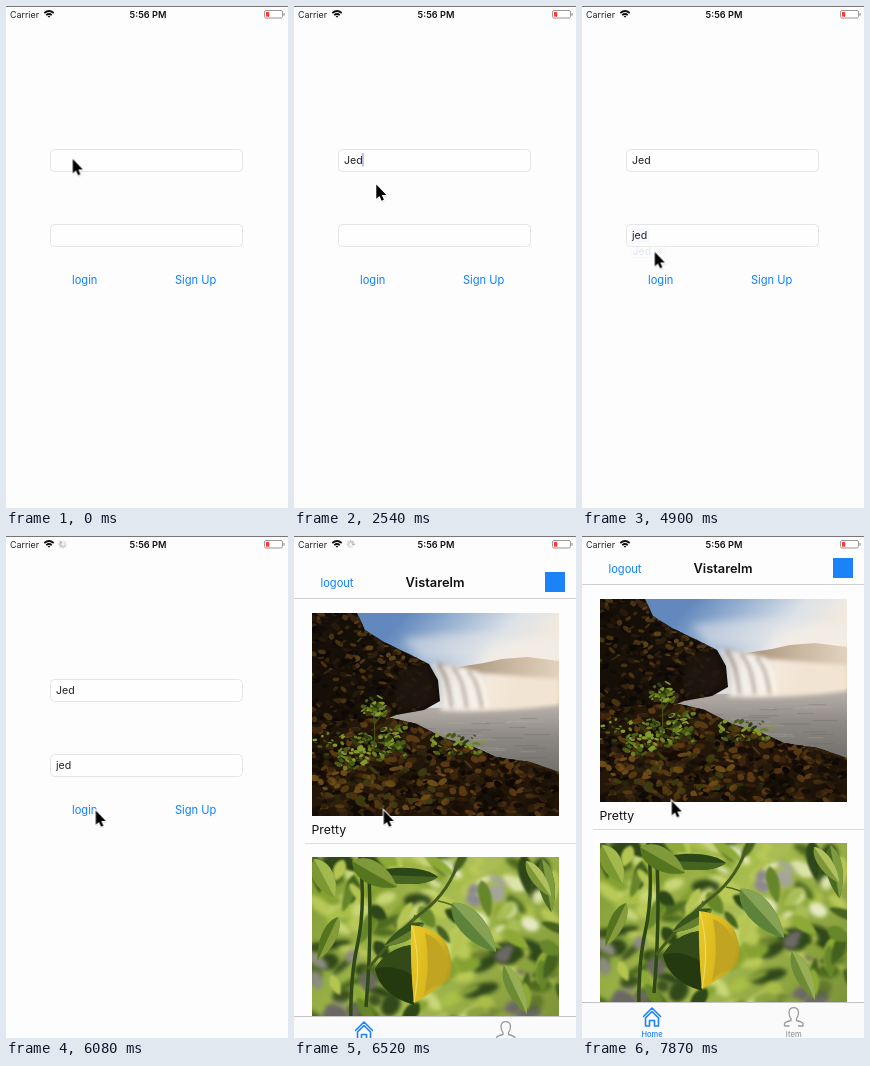
These frames come from a looping animation (282x502 px, 8 s). An HTML page with a canvas:

```html
<!DOCTYPE html>
<html lang="en">
<head>
<meta charset="utf-8">
<title>Login demo</title>
<style>
html, body { margin: 0; width: 100%; height: 100%; overflow: hidden; background: #fdfdfd; }
#stage { position: relative; width: 282px; height: 502px; overflow: hidden; background: #fdfdfd; font-family: Inter, Roboto, sans-serif; }
svg { position: absolute; left: 0; top: 0; overflow: visible; font-family: inherit; }
canvas { position: absolute; left: 18px; }
.anim { animation: 8s step-end -8ms infinite; }
.field { fill: #fefefe; stroke: #e5e5e5; }
.entry { font-size: 10.6px; fill: #222; }
.caret { fill: #4a62e0; }
.link { fill: #0f80fb; font-size: 11.1px; }
.mid { text-anchor: middle; }
#sheet { position: absolute; left: 0; top: 0; width: 282px; height: 502px; background: #fdfdfd; animation-name: rise; }
#cursor { animation-name: point; }

@keyframes point {
  0% { transform: translate(66.5px, 152.5px); }
  1.875% { transform: translate(66.5px, 154.5px); }
  29.875% { transform: translate(69px, 158px); }
  31.625% { transform: translate(82px, 178px); }
  33.5% { transform: translate(104px, 203px); }
  35.375% { transform: translate(124px, 222px); }
  37.25% { transform: translate(134px, 229px); }
  44.625% { transform: translate(170.5px, 220.5px); }
  52% { transform: translate(163px, 228px); }
  53.875% { transform: translate(140px, 239px); }
  55.75% { transform: translate(112px, 247px); }
  57.625% { transform: translate(86px, 249px); }
  59.375% { transform: translate(75px, 246px); }
  61.25% { transform: translate(72.5px, 245.5px); }
  63.125% { transform: translate(74px, 250px); }
  65% { transform: translate(80px, 262px); }
  66.875% { transform: translate(86px, 270px); }
  68.625% { transform: translate(89.5px, 274px); }
  98.375%, 100% { transform: translate(89.5px, 264.5px); }
}
@keyframes rise {
  0% { transform: translateY(502px); }
  77.875% { transform: translateY(496px); }
  79.625% { transform: translateY(123px); }
  81.5% { transform: translateY(14px); }
  83.375% { transform: translateY(1px); }
  85.25%, 100% { transform: none; }
}
@keyframes caretA {
  0% { opacity: 0; transform: none; }
  5.625% { opacity: 1; transform: none; }
  11.25% { opacity: .5; transform: none; }
  13.125% { opacity: 0; transform: none; }
  14.875% { opacity: .6; transform: none; }
  16.75% { opacity: 1; transform: translateX(5.7px); }
  22.375% { opacity: 1; transform: translateX(18px); }
  31.625% { opacity: .5; transform: translateX(18px); }
  33.5% { opacity: 1; transform: translateX(18px); }
  37.25%, 100% { opacity: 0; transform: none; }
}
@keyframes caretB {
  0% { opacity: 0; transform: none; }
  37.25% { opacity: 1; transform: none; }
  44.625% { opacity: .5; transform: none; }
  46.5% { opacity: 1; transform: translateX(2.6px); }
  48.375% { opacity: 1; transform: translateX(9px); }
  50.25% { opacity: 1; transform: translateX(15.5px); }
  59.375%, 100% { opacity: 0; transform: none; }
}
@keyframes key1 { 0% { visibility: hidden; } 16.75%, 100% { visibility: visible; } }
@keyframes key2 { 0% { visibility: hidden; } 22.375%, 100% { visibility: visible; } }
@keyframes key3 { 0% { visibility: hidden; } 46.5%, 100% { visibility: visible; } }
@keyframes key4 { 0% { visibility: hidden; } 48.375%, 100% { visibility: visible; } }
@keyframes key5 { 0% { visibility: hidden; } 50.25%, 100% { visibility: visible; } }
@keyframes hint {
  0% { opacity: 0; }
  52% { opacity: 1; }
  59.375% { opacity: .6; }
  61.25% { opacity: .16; }
  63.125%, 100% { opacity: 0; }
}
@keyframes press { 0% { opacity: 1; } 70.5% { opacity: .3; } 74.125%, 100% { opacity: 1; } }
@keyframes busy { 0% { opacity: 0; } 72.375% { opacity: 1; } 83.375%, 100% { opacity: 0; } }
@keyframes spin { to { transform: rotate(360deg); } }
#spin { animation: spin 1.2s steps(8) infinite; }
</style>
</head>
<body>
<div id="stage">
  <svg width="282" height="502">
    <rect class="field" x="44.5" y="143.5" width="192" height="22" rx="4"/>
    <rect class="field" x="44.5" y="218.5" width="192" height="22" rx="4"/>
    <text class="entry" x="50" y="158"><tspan class="anim" style="animation-name:key1">J</tspan><tspan class="anim" style="animation-name:key2">ed</tspan></text>
    <rect class="caret anim" style="animation-name:caretA" x="50.2" y="147" width="1.5" height="13.5"/>
    <g class="anim" style="animation-name:hint">
      <rect x="49" y="222" width="19" height="14" fill="#cfdcf8"/>
      <rect x="48.5" y="237.5" width="35" height="14" rx="2" fill="#fff" stroke="#ddd"/>
      <text x="50.5" y="248.5" font-size="10.6" fill="#3b6fd8">Jed</text>
      <path d="M75 242l5 5m0-5l-5 5" stroke="#999"/>
    </g>
    <text class="entry" x="50" y="232.5"><tspan class="anim" style="animation-name:key3">j</tspan><tspan class="anim" style="animation-name:key4">e</tspan><tspan class="anim" style="animation-name:key5">d</tspan></text>
    <rect class="caret anim" style="animation-name:caretB" x="50.2" y="222" width="1.5" height="13.5"/>
    <text class="link mid anim" style="animation-name:press" x="78.7" y="277.5">login</text>
    <text class="link mid" x="189.6" y="277.5">Sign Up</text>
  </svg>

  <div id="sheet" class="anim">
    <canvas id="falls" width="247" height="203" style="top:63px"></canvas>
    <canvas id="leaves" width="247" height="203" style="top:307px"></canvas>
    <svg width="282" height="502">
      <path d="M0 48.5H282" stroke="#d0d0d2"/>
      <path d="M11 293.5H282" stroke="#dcdcde"/>
      <text class="link" x="26.5" y="36.5">logout</text>
      <text class="mid" x="141" y="37" font-size="12.8" font-weight="600" fill="#111">Vistarelm</text>
      <rect x="251" y="22" width="20" height="20" fill="#1b82f8"/>
      <text x="17.5" y="284" font-size="12.3" fill="#111">Pretty</text>
      <rect y="466" width="282" height="36" fill="#fafafa"/>
      <path d="M0 466.5H282" stroke="#c4c4c6"/>
      <path d="M61.5 480.5L70 472l8.5 8.5M63.5 482V490H67.500V484.500H72.500V490H76.500V482L70 475.500Z" fill="none" stroke="#1b82f8" stroke-width="1.6" stroke-linejoin="round" stroke-linecap="round"/>
      <path d="M202.5 490V487.500Q203 486 209 484.500V482.500Q207 480.500 207 476Q207.500 471.700 211.700 471.700T216.500 476Q216.500 480.500 214.500 482.500V484.500Q220.500 486 221 487.500V490H216M202.500 490H207.500" fill="none" stroke="#9a9a9c" stroke-width="1.3" stroke-linejoin="round"/>
      <g class="mid" font-size="7.5" font-weight="500">
        <text x="70" y="500.5" fill="#1b82f8">Home</text>
        <text x="211.7" y="500.5" fill="#979799">Item</text>
      </g>
    </svg>
  </div>

  <svg width="282" height="502">
    <path d="M0 .5H282" stroke="#77777a"/>
    <text x="4" y="11.5" font-size="8.9" fill="#222">Carrier</text>
    <text class="mid" x="142" y="11.5" font-size="9.2" font-weight="600" fill="#111">5:56 PM</text>
    <g fill="none" stroke="#111" stroke-width="1.7">
      <path d="M38.3 7Q43 3 47.7 7M40.2 9.2Q43 6.8 45.8 9.2"/>
      <path d="M41.7 10.3Q43 9.4 44.3 10.3L43 11.8Z" fill="#111" stroke="none"/>
    </g>
    <rect x="258.5" y="4.5" width="18" height="7.5" rx="1.5" fill="none" stroke="#999"/>
    <rect x="260" y="6" width="3.2" height="4.7" fill="#fb3b30"/>
    <path d="M278 7v2.8" stroke="#999" stroke-width="1.2"/>
    <g class="anim" style="animation-name:busy">
      <g transform="translate(56.7 8.2)"><g id="spin"></g></g>
    </g>
  </svg>

  <svg width="14" height="20">
    <g id="cursor" class="anim">
      <path d="M.5 1.300V16L4 13 6 18 8.500 17 6.400 12.300H11Z" opacity=".12" stroke="#000"/>
      <path d="M.3.5V14.800L3.500 11.900 5.600 16.700 7.900 15.700 5.800 11H10.300Z" stroke="#fff" stroke-width="2" paint-order="stroke"/>
    </g>
  </svg>
</div>

<script>
const $ = id => document.getElementById(id);

$("spin").innerHTML = Array.from({ length: 8 }, (_, i) =>
  `<path d="M0-1.8V-3.8" stroke="#777" stroke-linecap="round" opacity="${0.2 + i * 0.1}" transform="rotate(${i * 45})"/>`).join("");

let seed = 7;
const rnd = (a = 0, b = 1) => {
  seed = (seed * 16807) % 2147483647;
  return a + (b - a) * seed / 2147483647;
};

const all = "M0 0H247V203H0Z";
const fill = (c, d, color) => { c.fillStyle = color; c.fill(new Path2D(d)); };
const line = (c, d, color, w) => { c.strokeStyle = color; c.lineWidth = w; c.stroke(new Path2D(d)); };

function fade(c, x0, y0, x1, y1, ...colors) {
  const g = c.createLinearGradient(x0, y0, x1, y1);
  colors.forEach((col, i) => g.addColorStop(i / (colors.length - 1), col));
  return g;
}

function soft(c, px, draw) {
  c.filter = `blur(${px}px)`;
  draw();
  c.filter = "none";
}

// Random flecks inside a shape and box
function flecks(c, d, [x0, y0, x1, y1], n, size, colors) {
  c.save();
  c.clip(new Path2D(d));
  for (let i = 0; i < n; i++) {
    c.fillStyle = colors[i % colors.length];
    c.beginPath();
    c.ellipse(rnd(x0, x1), rnd(y0, y1), rnd(.4, 1) * size, rnd(.2, .6) * size, rnd(-.8, .8), 0, 7);
    c.fill();
  }
  c.restore();
}

function leaf(c, x, y, len, wide, deg, color, shade) {
  c.save();
  c.translate(x, y);
  c.rotate(deg * Math.PI / 180);
  fill(c, `M0 0C${len * .2} ${-wide} ${len * .7} ${-wide * .8} ${len} 0C${len * .7} ${wide * .8} ${len * .2} ${wide} 0 0Z`, color);
  if (shade) fill(c, `M0 0C${len * .2} ${-wide} ${len * .7} ${-wide * .8} ${len} 0Z`, shade);
  c.restore();
}

function drawFalls(c) {
  fill(c, all, fade(c, 95, 0, 190, 85, "#6288bd", "#9db5d3", "#dde2e8", "#f6ebdd"));
  soft(c, 4, () => {
    fill(c, "M90 26Q170 14 247 26V46H110Z", "#e6e6e888");
    fill(c, "M175 36Q215 20 247 26V54H165Z", "#f6efe6aa");
  });
  fill(c, "M146 54L172 50 190 46 215 44 247 48V90H146Z", fade(c, 150, 50, 247, 60, "#a9947d", "#c9b69f", "#e2d2bc"));
  fill(c, "M85 96Q150 94 247 90V180H55V100Z", fade(c, 0, 92, 0, 155, "#b9b1aa", "#8d8985", "#75736f"));
  soft(c, 2, () => {
    fill(c, "M122 50Q144 51 168 60L247 66V92Q185 100 128 98Q131 72 122 50Z", fade(c, 122, 50, 200, 85, "#a79d94", "#e8e2dc", "#f4e9dc", "#f2e4d2"));
    for (let i = 0; i < 9; i++) {
      const x = 121 + i * 5;
      line(c, `M${x} ${51 + i}Q${x + 10} ${58 + i} ${x + 14} 95`, i % 3 == 1 ? "#8f8278aa" : "#fffdf9dd", 3);
    }
  });
  for (let i = 0; i < 34; i++) {
    const x = rnd(95, 220), y = rnd(103, 150);
    line(c, `M${x} ${y}h${rnd(8, 32)}`, i % 2 ? "#bdb6b044" : "#5a565344", 1);
  }
  const cliff = "M0 0H45L53 17 72 29 99 42 117 51 126 67 128 88 112 97 84 102 50 116 0 124Z";
  fill(c, cliff, "#160f08");
  flecks(c, cliff, [0, 0, 116, 118], 380, 5, ["#25190b", "#372410", "#0c0805", "#1c130a", "#49320f", "#110b06"]);
  flecks(c, cliff, [40, 8, 108, 66], 60, 4, ["#4a3413", "#5a4118", "#2d1e0c"]);
  soft(c, 2, () => fill(c, "M88 60Q106 50 117 57L124 84 110 94 84 98Q82 78 88 60Z", "#20170fcc"));
  const bank = "M0 112L40 106 80 105 105 111 132 125 160 133 184 144 218 149 247 159V203H0Z";
  fill(c, bank, "#24170a");
  flecks(c, bank, [0, 104, 247, 203], 750, 6, ["#3c260d", "#150d06", "#5a3a13", "#2d220c", "#1c1208", "#4b3110", "#0f0a05"]);
  flecks(c, bank, [0, 155, 140, 195], 70, 6, ["#6b4a17", "#54390f", "#3d3910"]);
  soft(c, 3, () => flecks(c, bank, [80, 160, 247, 203], 14, 12, ["#0c080599", "#140c0699"]));
  const grass = ["#4a5c17", "#6a8021", "#2f3d10", "#84992f"];
  flecks(c, bank, [0, 120, 60, 142], 24, 3, grass);
  flecks(c, all, [68, 112, 94, 146], 45, 4, grass);
  flecks(c, all, [118, 122, 172, 142], 46, 3.5, grass);
  flecks(c, all, [26, 122, 78, 158], 65, 4, grass);
  line(c, "M62 138Q64 108 60 92M62 112L72 98", "#43521a", 1.2);
  flecks(c, all, [51, 84, 74, 102], 34, 4, grass);
}

function drawLeaves(c) {
  fill(c, all, fade(c, 0, 0, 247, 160, "#7f9a35", "#a9bd50", "#7c9437"));
  soft(c, 2, () => {
    flecks(c, all, [0, 0, 247, 203], 120, 20, ["#a9bf48", "#4d6a1f", "#c9d678", "#86a232", "#30481a", "#b9c958"]);
    flecks(c, all, [118, 0, 240, 85], 20, 15, ["#dbe3a6", "#a9bd57", "#e6eac4"]);
    flecks(c, all, [0, 90, 70, 165], 12, 16, ["#6b6864", "#3d5120", "#8d8c80"]);
    flecks(c, all, [150, 85, 247, 165], 16, 15, ["#6d6a66", "#8ba33d", "#48622199"]);
    flecks(c, all, [160, 20, 205, 44], 6, 11, ["#8c8791", "#a5a4a0"]);
  });
  const greens = ["#8eaa36", "#44611e", "#b4c552", "#66862a", "#2e4718"];
  soft(c, .8, () => {
    for (let i = 0; i < 40; i++) leaf(c, rnd(-15, 247), rnd(-10, 165), rnd(20, 42), rnd(5, 11), rnd(10, 130), greens[i % 5]);
  });
  line(c, "M48 0Q54 50 45 90T40 203M57 20Q60 80 54 150", "#304716", 3.5);
  line(c, "M148 0Q138 34 112 54T56 112", "#465c1e", 3);
  line(c, "M126 44Q150 48 163 68M99 70L103 58", "#51691f", 1.6);
  leaf(c, 126, 20, 74, 12, 182, "#2c4717", "#466422");
  leaf(c, 40, 4, 52, 17, 30, "#55751f", "#80993a");
  leaf(c, 2, 2, 44, 15, 62, "#7b9832", "#a3b84d");
  leaf(c, 140, 46, 66, 18, 48, "#5d823a", "#86a355");
  leaf(c, 230, 2, 54, 12, 80, "#4a6a22", "#7e9b40");
  leaf(c, 214, 4, 44, 10, 55, "#7e9839", "#b1c05e");
  leaf(c, 26, 60, 48, 11, 115, "#55741f", "#859b3c");
  leaf(c, 112, 66, 46, 10, 150, "#38551b", "#647f2e");
  leaf(c, 192, 108, 54, 12, 65, "#6d8a37", "#97ae54");
  fill(c, "M99 88Q74 92 63 112Q68 138 102 148Z", "#24390f");
  fill(c, "M99 88Q74 92 63 112Q80 106 100 118Z", "#314a17");
  fill(c, "M99 68Q120 70 133 84Q143 104 137 122Q120 136 102 146Q98 110 99 68Z", fade(c, 99, 100, 140, 110, "#e6c526", "#d9b81f", "#b49c22"));
  fill(c, "M113 76Q131 83 136 106Q136 118 128 127Q120 128 112 138Q119 108 113 76Z", "#c2a423");
  line(c, "M100 69Q110 105 102 145", "#eedb58", 1.2);
}

drawFalls($("falls").getContext("2d"));
drawLeaves($("leaves").getContext("2d"));
</script>
</body>
</html>
```
